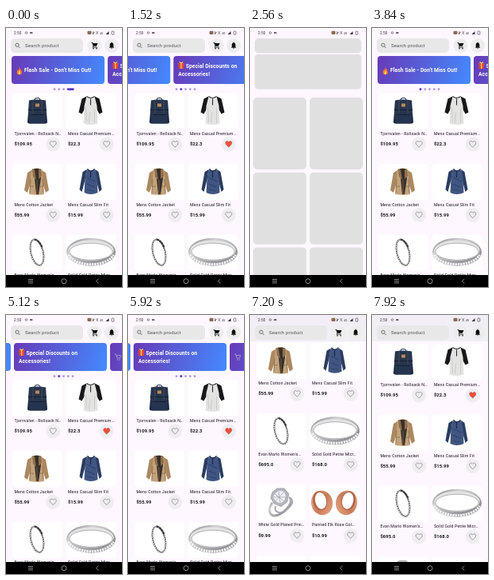
Recreate the animation shown at these times as an HTML page. Size 146 by 324 pixels, loop 8 s.

```html
<!DOCTYPE html>
<html lang="en">
<head>
<meta charset="utf-8">
<title>Shop screen</title>
<style>
html, body { margin: 0; width: 100%; height: 100%; overflow: hidden; background: #fef7ff; }
svg { display: block; width: 100vw; height: 100vh; font-family: Roboto, Inter, sans-serif; }
.loop { animation: 8s linear infinite; }
.banner { fill: #fff; font-weight: 700; font-size: 6.7px; letter-spacing: .08px; }
.name { font-size: 5.2px; letter-spacing: .13px; fill: #17151b; }
.price { font-size: 5.95px; font-weight: 700; letter-spacing: .05px; fill: #17151b; }

#slides { animation-name: slide; }
@keyframes slide {
  0%, 13.7% { transform: translateX(0); animation-timing-function: cubic-bezier(.4, 0, .2, 1); }
  27.45%, 28.75% { transform: translateX(-121px); }
  28.76%, 53% { transform: translateX(0); animation-timing-function: cubic-bezier(.4, 0, .2, 1); }
  66.75%, 100% { transform: translateX(-121px); }
}
#page { animation-name: scroll; }
@keyframes scroll {
  0%, 74.5% { transform: translateY(0); animation-timing-function: ease-in-out; }
  81% { transform: translateY(-135px); animation-timing-function: ease-out; }
  85% { transform: translateY(-150px); }
  87% { transform: translateY(-149px); animation-timing-function: ease-in-out; }
  99%, 100% { transform: translateY(-45px); }
}
#tint { animation-name: tint; }
@keyframes tint { 0%, 74.8% { opacity: 0; } 77%, 100% { opacity: 1; } }
#skeleton { animation-name: load; animation-timing-function: step-end; }
@keyframes load { 0% { visibility: hidden; } 28.75% { visibility: visible; } 42%, 100% { visibility: hidden; } }
#liked { animation-name: like; animation-timing-function: step-end; }
@keyframes like {
  0% { visibility: hidden; } 12.5% { visibility: visible; }
  28.75% { visibility: hidden; } 53%, 100% { visibility: visible; }
}
#worm { animation-name: worm; }
@keyframes worm {
  0% { x: 77px; width: 8.6px; }
  1.6% { x: 59.6px; width: 26px; }
  4%, 15% { x: 59.6px; width: 2.8px; }
  17% { x: 59.6px; width: 8.6px; }
  18.7%, 28.75% { x: 65.4px; width: 2.8px; }
  28.76%, 55% { x: 59.6px; width: 2.8px; }
  57% { x: 59.6px; width: 8.6px; }
  58.7%, 100% { x: 65.4px; width: 2.8px; }
}
</style>
</head>
<body>
<svg viewBox="0 0 146 324" preserveAspectRatio="none">
  <defs>
    <linearGradient id="sale" gradientUnits="userSpaceOnUse" x1="0" y1="0" x2="117" y2="36">
      <stop stop-color="#673ab7"/><stop offset="1" stop-color="#448aff"/>
    </linearGradient>
    <linearGradient id="silver" x2="1" y2="1">
      <stop stop-color="#77777a"/><stop offset=".3" stop-color="#d2d2d4"/>
      <stop offset=".65" stop-color="#a2a2a5"/><stop offset="1" stop-color="#77777a"/>
    </linearGradient>
    <linearGradient id="rose" x2="1" y2="1">
      <stop stop-color="#f2bf9f"/><stop offset=".5" stop-color="#c67a58"/><stop offset="1" stop-color="#e9ab88"/>
    </linearGradient>
    <path id="heart" d="M0 3.7C-2.8 1.3-4 0-4-1.500C-4-3.800-1.300-4.500 0-2.600C1.300-4.500 4-3.800 4-1.500C4 0 2.800 1.300 0 3.700Z"/>

    <!-- Product art, each inside a 63 by 45 tile -->
    <g id="backpack">
      <path d="M28 9Q28 6 31.500 6T35 9" fill="none" stroke="#26344f" stroke-width="1.2"/>
      <path d="M20 24H43L44 36Q44 38 42 38H21Q19 38 19 36Z" fill="#1b2940"/>
      <path d="M21 9Q31 7 42 9L43 22L41 38H22L20 22Z" fill="#26354f"/>
      <path d="M20 21H43M23 27H40" stroke="#141f33" stroke-width="1"/>
      <path d="M26 9V25M37 9V25" stroke="#4e4a4a" stroke-width=".9"/>
      <rect x="29" y="13" width="5" height="4" fill="#b98a55"/>
    </g>
    <g id="raglan">
      <path d="M26 4L20 7L16 24L20 26L25 17ZM36 4L42 7L46 24L42 26L37 17Z" fill="#18181b"/>
      <path d="M26 4Q31 7 36 4L39 16L40 38Q31 41 22 38L23 16Z" fill="#e3e3e2"/>
      <path d="M26 4Q31 8 36 4M31 7V15" fill="none" stroke="#2b2b2e" stroke-width="1.100"/>
      <path d="M25 18L26 36M36 20L36 37M30 24L29 37" stroke="#cacac9" stroke-width="1"/>
    </g>
    <g id="jacket">
      <path d="M24 8L19 11L15 33L19 36L24 21ZM37 8L42 11L46 33L42 36L37 21Z" fill="#ab8860"/>
      <path d="M24 7L31 5L37 7L40 38L32 39L21 38Z" fill="#c3a37b"/>
      <path d="M27 6H34L36 18L33 38H30L28 18Z" fill="#37302b"/>
      <path d="M25 6L26 16L30 20L28 7ZM36 6L37 15L33 19L33 7Z" fill="#8f6f4c"/>
      <path d="M31 20V38M22 28H27M34 28H39M23 19L22 36M38 19L39 36" stroke="#8a6a47" stroke-width=".8"/>
    </g>
    <g id="shirt">
      <path d="M26 7L21 10L17 32L20 35L24 20ZM37 7L41 10L45 32L42 35L38 20Z" fill="#2b3c60"/>
      <path d="M26 7Q31 9 37 7L39 18L40 36Q31 40 23 36L24 18Z" fill="#405581"/>
      <path d="M27 6Q31 12 36 6M31 10V17" fill="none" stroke="#1c2844" stroke-width="1.200"/>
      <path d="M27 17L37 22M26 25L36 29M26 32L36 34" stroke="#33466f" stroke-width="1.200"/>
    </g>
    <g id="bracelet" fill="none" transform="rotate(-14 31 22)">
      <ellipse cx="31" cy="22" rx="7.800" ry="16.500" stroke="#5d5d60" stroke-width="1.900"/>
      <ellipse cx="31" cy="22" rx="7.800" ry="16.500" stroke="#e2e2e3" stroke-width="1.100" stroke-dasharray="1.500 1.200"/>
      <path d="M32 5.500Q38 9 38.800 18" stroke="#38383b" stroke-width="2.200" stroke-dasharray="3 .6"/>
    </g>
    <g id="band">
      <ellipse cx="31.500" cy="21.500" rx="31" ry="17.500" fill="url(#silver)"/>
      <ellipse cx="31.500" cy="19.500" rx="28.500" ry="12.800" fill="#e3e3e4"/>
      <ellipse cx="31.500" cy="21" rx="27" ry="10.500" fill="#fff" stroke="#98989b" stroke-width=".7"/>
      <path d="M3 25C12 41 51 41 60 25" fill="none" stroke="#f6f6f6" stroke-width="3" stroke-dasharray="2.400 .9"/>
    </g>
    <g id="diamond">
      <path d="M20 23C13 35 18 42 28 38C38 34 47 22 42 17" fill="none" stroke="url(#silver)" stroke-width="3"/>
      <path d="M24 27C22 36 31 38 39 31C46 25 48 20 41 16" fill="none" stroke="#a4a4ac" stroke-width="1.800"/>
      <path d="M20 10L26 5L35 5L41 12L39 22L31 28L22 24L18 17Z" fill="#b4b4bd" stroke="#85858f" stroke-width=".7" stroke-dasharray="1.500 .8"/>
      <path d="M23 12L28 8L35 9L37 15L35 21L30 24L24 21L21 16Z" fill="#eeeef4"/>
      <path d="M23 12L35 21M35 9L24 21M28 8L30 24M21 16H37" stroke="#92929e" stroke-width=".6"/>
    </g>
    <g id="tunnel">
      <ellipse cx="15" cy="23" rx="13.500" ry="15.500" transform="rotate(-12 15 23)" fill="url(#rose)"/>
      <ellipse cx="12.500" cy="20.500" rx="9" ry="12" transform="rotate(-12 12.500 20.500)" fill="#b3684a"/>
      <ellipse cx="13.500" cy="20.500" rx="7" ry="10.500" transform="rotate(-12 13.500 20.500)" fill="#fff"/>
    </g>
    <g id="tunnels">
      <use href="#tunnel"/>
      <use href="#tunnel" transform="translate(61 0) scale(-1 1)"/>
    </g>
    <g id="box"><rect x="20" y="17" width="23" height="24" rx="2" fill="#3a3c42"/></g>
  </defs>

  <rect width="146" height="324" fill="#fef7ff"/>
  <g id="page" class="loop">
    <g id="slides" class="loop">
      <g transform="translate(7 35)">
        <rect width="117" height="35" rx="4" fill="url(#sale)"/>
        <path d="M9.500 13C10 16 13 17 13 20.300A3.200 3.200 0 0 1 6.600 20.300C6.600 18.500 7.600 17.600 8 16.500L9 17.700C9.700 16.300 9.800 14.600 9.500 13Z" fill="#ff6d2d"/>
        <path d="M9.900 18C11.800 20 11.700 22.900 9.800 22.900S7.900 20.600 9.900 18Z" fill="#ffd04a"/>
        <text class="banner" x="16" y="19.700">Flash Sale - Don't Miss Out!</text>
      </g>
      <g transform="translate(128 35)">
        <rect width="117" height="35" rx="4" fill="url(#sale)"/>
        <path d="M6.500 10.500H13V16H6.500ZM6 9H13.500V11H6Z" fill="#e2483d"/>
        <path d="M9.700 9V16M7.500 7.500L9.700 9L12 7.500" fill="none" stroke="#ffcf55" stroke-width="1.200"/>
        <text class="banner" x="15.500" y="15">Special Discounts on</text>
        <text class="banner" x="6" y="24.500">Accessories!</text>
      </g>
      <g transform="translate(249 35)">
        <rect width="117" height="35" rx="4" fill="url(#sale)"/>
        <path d="M6 14H7.500L9 19H12.500L13.500 15.500H8" fill="none" stroke="#a99ac8" stroke-width=".9"/>
        <circle cx="9.500" cy="21" r=".8" fill="#a99ac8"/><circle cx="12" cy="21" r=".8" fill="#a99ac8"/>
      </g>
    </g>
    <g id="dots" fill="#ab95e2"></g>
    <rect id="worm" class="loop" x="59.6" y="75.2" width="2.8" height="2.8" rx="1.4" fill="#5a3cc4"/>
    <g id="grid"></g>
    <g id="liked" class="loop">
      <use href="#heart" x="126.700" y="145.300" fill="#f44c37"/>
    </g>
  </g>

  <rect width="146" height="33" fill="#fef7ff"/>
  <rect id="tint" class="loop" width="146" height="33" fill="#f1eff5"/>
  <rect x="6" y="13" width="91" height="18" rx="5" fill="#e8e8e8"/>
  <g fill="none" stroke="#555" stroke-width=".8">
    <circle cx="14" cy="21.300" r="2.100"/><path d="M15.600 23L17.600 25"/>
  </g>
  <text x="24" y="24.300" font-size="6.100" letter-spacing=".1" fill="#55525a">Search product</text>
  <circle cx="111.500" cy="22" r="9" fill="#ededee"/>
  <circle cx="133" cy="22" r="9" fill="#ededee"/>
  <g fill="#0c0c0e">
    <path d="M107.500 18H109L109.500 19H115.500L113.800 22.800H110.300L109.800 23.800H115V24.500H108.700L109.600 22.500L108.300 18.800H107.500Z"/>
    <circle cx="110" cy="25.700" r=".8"/><circle cx="114" cy="25.700" r=".8"/>
    <path d="M129.800 24.800L130.700 23.700V21C130.700 19.500 131.500 18.700 132.500 18.400V17.800H133.500V18.400C134.500 18.700 135.300 19.500 135.300 21V23.700L136.200 24.800ZM132.200 25.400H133.800A.8.8 0 0 1 132.200 25.400Z"/>
  </g>

  <g id="skeleton" class="loop" fill="#e0e0e0">
    <rect y="8" width="146" height="301" fill="#fef7ff"/>
    <rect x="6" y="13" width="134" height="18.500" rx="5"/>
    <rect x="6" y="33" width="134" height="43.500" rx="4"/>
    <g id="blanks"></g>
  </g>

  <g fill="#39363c">
    <text x="10" y="7.700" font-size="4.700" letter-spacing=".15">2:50</text>
    <circle cx="25.500" cy="6" r="1.300" fill="none" stroke="#555" stroke-width=".7"/>
    <rect x="30" y="5.300" width="3.500" height="1.500" rx=".6"/>
    <rect x="102.500" y="3.700" width="5" height="4.300" rx="1" fill="#8a6a50"/>
    <path d="M109.500 4V8L111.500 5L108.700 7M113.500 4L116 8M116 4L113.500 8" fill="none" stroke="#555" stroke-width=".6"/>
    <text x="118" y="7.500" font-size="3.400">4G</text>
    <path d="M125.500 8L129.500 4V8Z"/>
    <rect x="133" y="4" width="2.800" height="4.200" rx=".6" fill="none" stroke="#39363c" stroke-width=".6"/>
  </g>
  <rect y="309" width="146" height="15" fill="#000"/>
  <g fill="none" stroke="#c9c9c9" stroke-width=".7">
    <path d="M28 314.500H34M28 316.700H34M28 318.900H34M116.300 314L113.500 316.700L116.300 319.400"/>
    <circle cx="73" cy="316.700" r="3"/>
  </g>
</svg>
<script>
const PITCH = 88.6, TOP = 81.5;
const products = [
  ["backpack", "Tjornvalen - Rollsack N…", "$109.95"],
  ["raglan", "Mens Casual Premium…", "$22.3"],
  ["jacket", "Mens Cotton Jacket", "$55.99"],
  ["shirt", "Mens Casual Slim Fit", "$15.99"],
  ["bracelet", "Evan Marlo Women's…", "$695.0"],
  ["band", "Solid Gold Petite Micr…", "$168.0"],
  ["diamond", "White Gold Plated Prin…", "$9.99"],
  ["tunnels", "Painted Elk Rose Gol…", "$10.99"],
  ["box", "Portable Hard Drive", "$64.0"],
  ["box", "Internal Solid Drive", "$109.0"]
];
const fill = (id, html) => document.getElementById(id).innerHTML = html;

const card = ([art, name, price], i) => {
  const x = 8 + (i % 2) * 67.5, y = TOP + (i >> 1) * PITCH;
  return `<g transform="translate(${x} ${y})">
    <rect width="63" height="45" rx="4" fill="#fff"/>
    <use href="#${art}"/>
    <text class="name" x="2.400" y="52.500">${name}</text>
    <text class="price" x="2.400" y="65.700">${price}</text>
    <circle cx="51.200" cy="64" r="9" fill="#efedf0"/>
    <use href="#heart" x="51.200" y="63.800" fill="none" stroke="#8b888d" stroke-width=".8"/>
  </g>`;
};
fill("grid", products.map(card).join(""));

fill("dots", [0, 1, 2, 3, 4].map(i =>
  `<circle cx="${61 + i * 5.75}" cy="76.6" r="1.4"/>`).join(""));

fill("blanks", [0, 1, 2, 3, 4, 5].map(i =>
  `<rect x="${4 + (i % 2) * 71}" y="${87 + (i >> 1) * 93.7}" width="67" height="90" rx="5"/>`).join(""));
</script>
</body>
</html>
```
